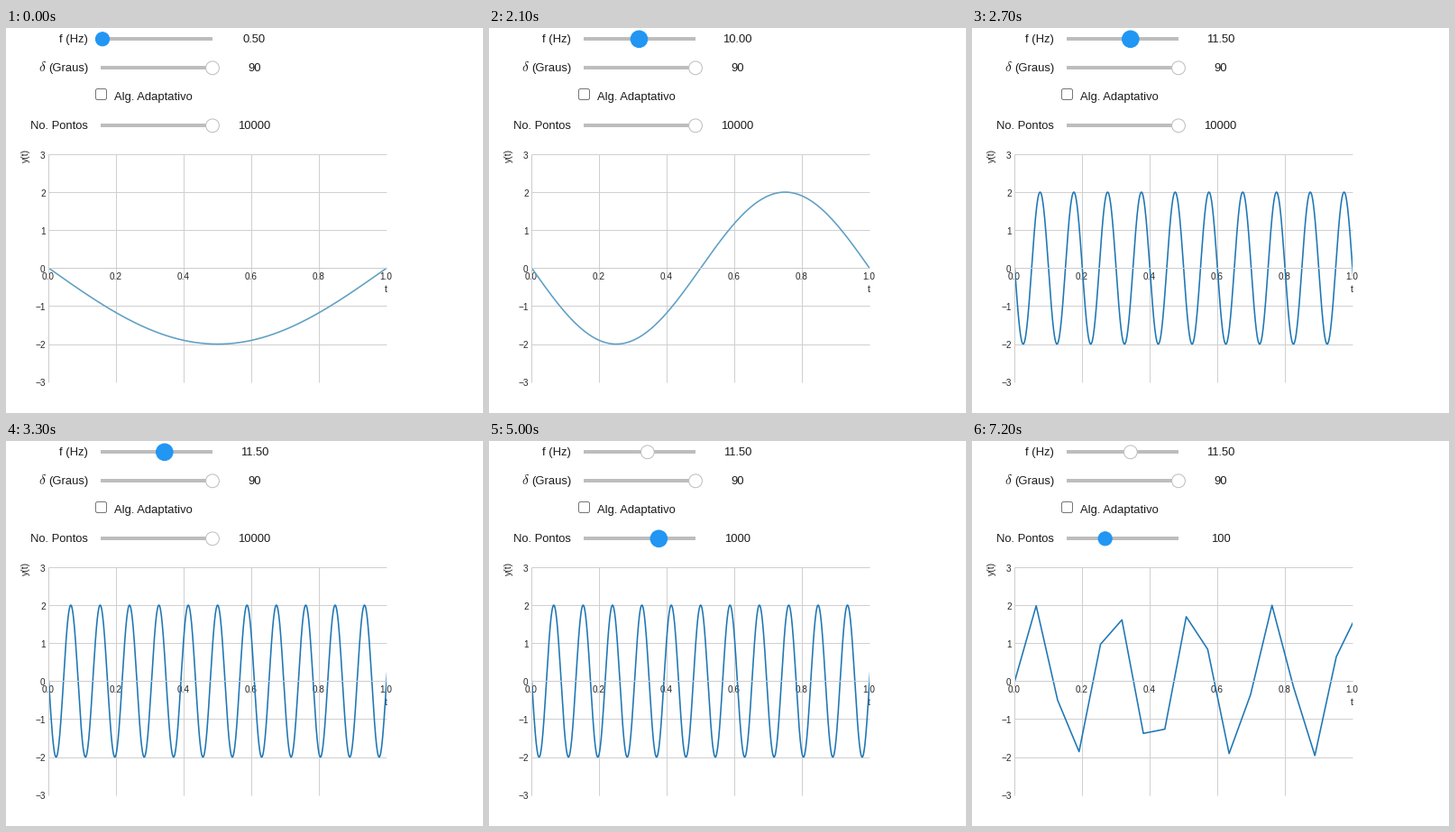
Animation of 529 by 427 pixels, one loop 8000 ms. Source, as a matplotlib script:

```python
import numpy as np
import matplotlib.pyplot as plt
from matplotlib.animation import FuncAnimation
from matplotlib.patches import Circle, FancyBboxPatch, Rectangle

W, H, DPI = 529, 427, 64
PX = 72 / DPI                      # points per pixel
FRAMES, STEP = 80, 100             # 8 s loop
BLUE, TRACK, GRID, SPINE = "#2196f3", "#bdbdbd", "#d0d0d0", "#cccccc"
INK, TICK_INK = "#1c1c1c", "#262626"
LINE, SOFT_LINE = "#1f77b4", "#5f9fc4"

plt.rcParams["font.family"] = "Liberation Sans"
plt.rcParams["mathtext.fontset"] = "cm"

# (start in ms, value) schedules
FREQ = [(0, 0.5), (1300, 1), (1400, 2), (1500, 3.5), (1600, 5), (1700, 7),
        (1800, 8.5), (2000, 9.5), (2100, 10), (2400, 11), (2500, 11.5)]
FREQ_LOOK = [(0, "hover"), (600, "idle"), (800, "hover"), (1200, "drag"),
             (3400, "hover"), (4800, "idle")]
POINTS = [(0, 10000), (5000, 1000), (6800, 100)]
POINTS_LOOK = [(0, "idle"), (4500, "hover"), (4800, "drag"), (5800, "hover"),
               (6700, "drag"), (7200, "hover")]
BOX_EDGE = [(0, "#767676"), (3700, "#4f4f4f"), (4000, "#767676")]
# the plot lags behind the sliders: (frequency, number of points)
CURVE = [(0, (0.5, 10000)), (1800, (1, 10000)), (2300, (8.5, 10000)),
         (2700, (10, 10000)), (3300, (11.5, 10000)), (5100, (11.5, 1000)),
         (6900, (11.5, 100))]


def at(schedule, ms):
    return [v for start, v in schedule if start <= ms][-1]


def plot_x(t):
    return 47.4 + 374.6 * t


def plot_y(y):
    return 266.3 - 42.13 * y


fig = plt.figure(figsize=(W / DPI, H / DPI), dpi=DPI, facecolor="white")
ax = fig.add_axes([0, 0, 1, 1])
ax.set_xlim(0, W)
ax.set_ylim(H, 0)
ax.axis("off")


def label(x, y, s, size=13, ha="center", va="baseline", color=INK, **kw):
    return ax.text(x, y, s, fontsize=size * PX, ha=ha, va=va, color=color, **kw)


def line(xs, ys, color=GRID, z=1):
    ax.plot(xs, ys, color=color, lw=PX, zorder=z, solid_capstyle="butt")


class Slider:
    def __init__(self, y, lo, hi, fmt, name):
        self.lo, self.hi, self.fmt, self.y = lo, hi, fmt, y + 0.3
        ax.add_patch(Rectangle((105, y - 2), 124, 4, fc=TRACK, lw=0))
        self.knob = ax.add_patch(Circle((229, self.y), 7.5, lw=PX, zorder=3))
        self.text = label(275.5, y + 4, "")
        label(91, y + 4, name, ha="right")

    def show(self, value, look):
        part = (value - self.lo) / (self.hi - self.lo)
        self.knob.center = 107 + 122 * part, self.y
        self.knob.set_radius({"idle": 7.4, "hover": 7.6, "drag": 9.3}[look])
        self.knob.set_facecolor("white" if look == "idle" else BLUE)
        self.knob.set_edgecolor(TRACK if look == "idle" else BLUE)
        self.text.set_text(self.fmt(value))


freq = Slider(12, 0.5, 20, lambda v: f"{v:.2f}", "f (Hz)")
phase = Slider(44, 0, 90, lambda v: f"{v:.0f}", "(Graus)")
points = Slider(108, 1, 4, lambda v: f"{10 ** v:.0f}", "No. Pontos")
label(36, 48, r"$\delta$", 15.5, ha="left")
phase.show(90, "idle")

box = ax.add_patch(FancyBboxPatch((99.5, 67.5), 12, 12, fc="white", lw=PX,
                                  boxstyle="round,pad=0,rounding_size=2"))
label(120, 80, "Alg. Adaptativo", ha="left")

# chart frame
left, right = plot_x(0), plot_x(1)
top, zero, bottom = plot_y(3), plot_y(0), plot_y(-3)
for t in np.arange(0, 1.1, 0.2):
    if 0 < t < 0.9:
        line([plot_x(t)] * 2, [top, bottom])
    label(plot_x(t) - 0.7, 279, f"{t:.1f}", 10, color=TICK_INK)
for v in range(-3, 4):
    if v > -3:
        line([left, right], [plot_y(v)] * 2)
    label(43.7, plot_y(v) + 4.6, f"{v}".replace("-", "\u2212"), 10,
          ha="right", color=TICK_INK)
line([left, left], [top, bottom], SPINE, 4)
line([left, right], [zero, zero], SPINE, 4)
label(421.5, 293, "t", 10.5, color=TICK_INK)
label(22.2, 141.2, "y(t)", 10.5, va="center", color=TICK_INK, rotation=90)

curve, = ax.plot([], [], lw=1.6 * PX, zorder=3.5)
curve.set_clip_path(Rectangle((left, top), right - left, bottom - top,
                              transform=ax.transData))


def draw(i):
    ms = i * STEP
    freq.show(at(FREQ, ms), at(FREQ_LOOK, ms))
    points.show(np.log10(at(POINTS, ms)), at(POINTS_LOOK, ms))
    box.set_edgecolor(at(BOX_EDGE, ms))
    f, n = at(CURVE, ms)
    t = np.linspace(0, 2 * np.pi, n)
    t = t[t < 1.1]
    wave = 2 * np.cos(2 * np.pi * f * t + np.pi / 2)
    curve.set_data(plot_x(t), plot_y(wave))
    # slow waves come out paler
    curve.set_color(SOFT_LINE if f <= 1 else LINE)
    return []


anim = FuncAnimation(fig, draw, frames=FRAMES, interval=STEP, repeat=True,
                     repeat_delay=0, init_func=lambda: draw(0))
plt.show()
```
